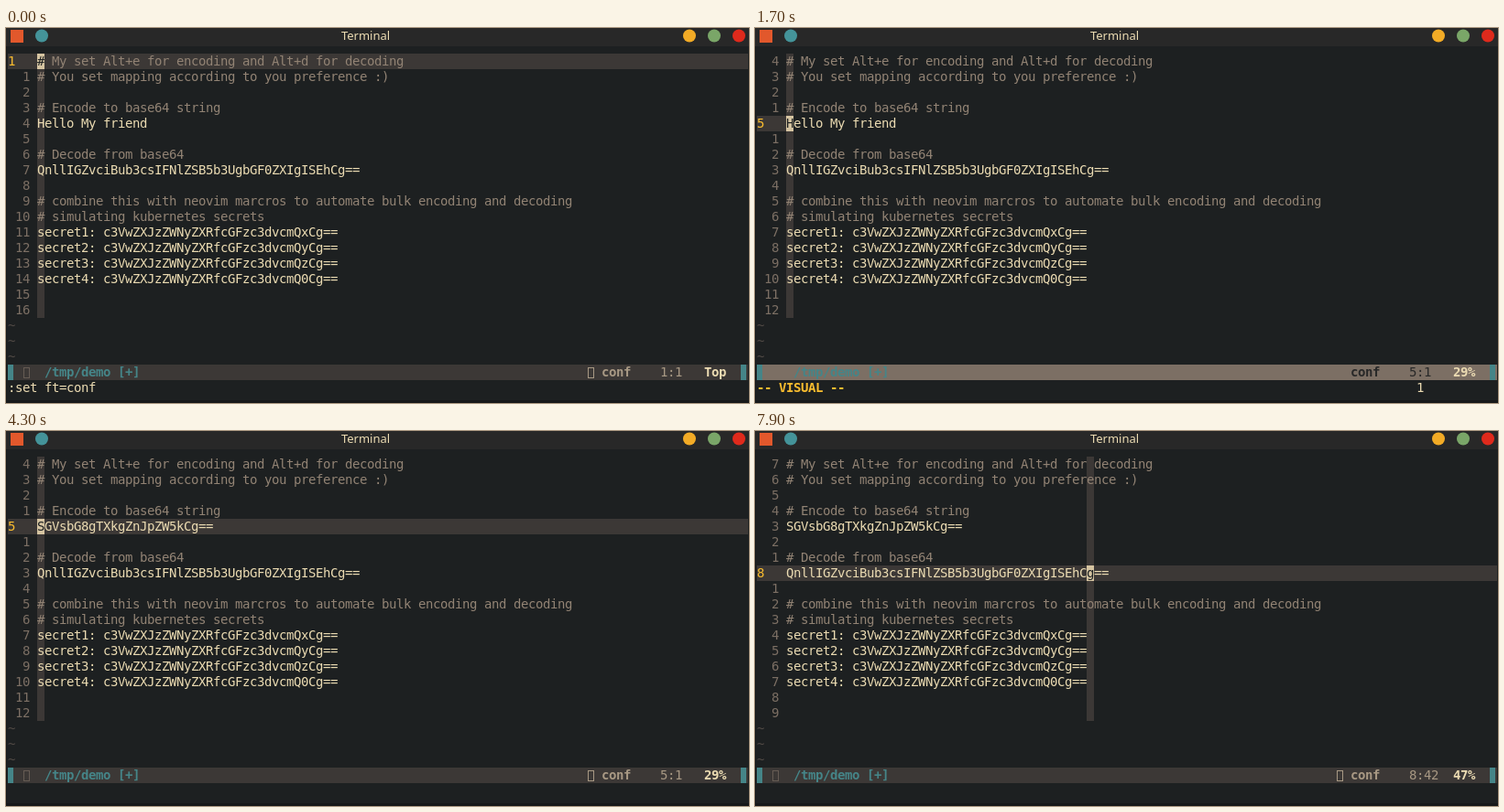
These frames come from a looping animation (811x410 px, 8000 ms). An HTML page with a canvas:

```html
<!DOCTYPE html>
<html lang="en">
<head>
<meta charset="utf-8">
<title>Terminal</title>
<style>
html, body { margin: 0; width: 100%; height: 100%; overflow: hidden; background: #1d2021; }
canvas { display: block; }
</style>
</head>
<body>
<canvas width="811" height="410"></canvas>
<script>
const ctx = document.querySelector('canvas').getContext('2d');
const LOOP = 8000, CELL_W = 8, CELL_H = 17, LEFT = 2, TOP = 28, GUTTER = 4;
const STATUS_ROW = 20, COMMAND_ROW = 21;
const C = {
  bg: '#1d2021', line: '#3c3836', fg: '#ebdbb2', comment: '#928374', number: '#7c6f64',
  dim: '#504945', yellow: '#fabd2f', cursor: '#d5c4a1', selected: '#665c54',
  teal: '#458588', info: '#a89984', dark: '#282828'
};

const LINES = [
  '# My set Alt+e for encoding and Alt+d for decoding',
  '# You set mapping according to you preference :)',
  '',
  '# Encode to base64 string',
  'Hello My friend',
  '',
  '# Decode from base64',
  'QnllIGZvciBub3csIFNlZSB5b3UgbGF0ZXIgISEhCg==',
  '',
  '# combine this with neovim marcros to automate bulk encoding and decoding',
  '# simulating kubernetes secrets',
  ...['Qx', 'Qy', 'Qz', 'Q0'].map((end, i) => `secret${i + 1}: c3VwZXJzZWNyZXRfcGFzc3dvcm${end}Cg==`),
  '', ''
];
const ENCODED = 'SGVsbG8gTXkgZnJpZW5kCg==';

// Cursor moves: [time, line, column]
const MOVES = [
  [0, 1, 1], [500, 2, 1], [700, 3, 1], [900, 4, 1], [1100, 5, 1],
  [2500, 5, 5], [2900, 5, 8], [3300, 5, 15], [4300, 5, 1],
  [5600, 6, 1], [5900, 7, 1], [6200, 8, 1], [7900, 8, 42]
];
const VISUAL_START = 1700, VISUAL_END = 4300;

const cellX = col => LEFT + col * CELL_W;
const cellY = row => TOP + row * CELL_H;

function fill(col, row, cols, rows, color) {
  ctx.fillStyle = color;
  ctx.fillRect(cellX(col), cellY(row), cols * CELL_W, rows * CELL_H);
}

function print(text, col, row, color, bold) {
  ctx.font = `${bold ? 'bold ' : ''}14px "DejaVu Sans Mono", monospace`;
  ctx.textAlign = 'left';
  ctx.fillStyle = color;
  [...text].forEach((ch, i) => ctx.fillText(ch, cellX(col + i), cellY(row) + 13));
}

function emptyGlyph(col, row, color) {
  ctx.strokeStyle = color;
  ctx.strokeRect(cellX(col) + 1.5, cellY(row) + 3.5, 6, 11);
}

function disc(x, color) {
  ctx.fillStyle = color;
  ctx.beginPath();
  ctx.arc(x, 8.5, 7, 0, Math.PI * 2);
  ctx.fill();
}

function drawWindow() {
  ctx.fillStyle = C.bg;
  ctx.fillRect(0, 0, 811, 410);
  ctx.fillStyle = '#282828';
  ctx.fillRect(0, 0, 811, 20);
  ctx.fillStyle = '#161819';
  ctx.fillRect(0, 20, 1, 390);
  ctx.fillRect(0, 407, 811, 3);
  ctx.fillStyle = '#e2582c';
  ctx.fillRect(5, 2, 14, 14);
  disc(39, '#449399');
  disc(746, '#f2ab26');
  disc(773, '#7aa668');
  disc(800, '#df2a1c');
  ctx.font = '13px "Noto Sans", sans-serif';
  ctx.textAlign = 'center';
  ctx.fillStyle = C.fg;
  ctx.fillText('Terminal', 392.5, 13);
}

function drawBuffer(lines, line, col, visual) {
  const row = line - 1, x = GUTTER + col - 1;
  fill(0, row, visual ? GUTTER : 101, 1, C.line);
  fill(x, 0, 1, lines.length, C.line);
  lines.forEach((text, i) => {
    const label = i === row ? String(line) : String(Math.abs(i - row)).padStart(3);
    print(label, 0, i, i === row ? C.yellow : C.number);
    print(text, GUTTER, i, text[0] === '#' ? C.comment : C.fg);
  });
  if (visual) {
    fill(GUTTER, row, col, 1, C.fg);
    print(lines[row].slice(0, col), GUTTER, row, C.selected);
  }
  fill(x, row, 1, 1, C.cursor);
  print(lines[row][col - 1] || '', x, row, C.bg);
  for (let i = lines.length; i < STATUS_ROW; i++) print('~', 0, i, C.dim);
}

function drawStatus(line, col, visual, total) {
  const info = visual ? C.dark : C.info;
  fill(0, STATUS_ROW, 101, 1, visual ? C.number : C.line);
  fill(0, STATUS_ROW, 0.75, 1, C.teal);
  fill(100, STATUS_ROW, 0.75, 1, C.teal);
  if (!visual) {
    emptyGlyph(2, STATUS_ROW, '#665c54');
    emptyGlyph(79, STATUS_ROW, C.info);
  }
  print('/tmp/demo [+]', 5, STATUS_ROW, C.teal, true);
  print('conf', 81, STATUS_ROW, info, true);
  print(`${line}:${col}`, 89, STATUS_ROW, info);
  const place = line === 1 ? 'Top' : Math.floor(line / total * 100) + '%';
  print(place, 95, STATUS_ROW, C.fg, true);
}

function draw(t) {
  const [, line, col] = MOVES.findLast(move => move[0] <= t);
  const visual = t >= VISUAL_START && t < VISUAL_END;
  const lines = LINES.slice();
  if (t >= VISUAL_END) lines[4] = ENCODED;

  drawWindow();
  drawBuffer(lines, line, col, visual);
  drawStatus(line, col, visual, lines.length);
  if (visual) {
    print('-- VISUAL --', 0, COMMAND_ROW, C.yellow, true);
    print(String(col), 90, COMMAND_ROW, C.fg);
  } else if (t < VISUAL_START) {
    print(':set ft=conf', 0, COMMAND_ROW, C.fg);
  }
}

const start = performance.now();
function tick() {
  draw((performance.now() - start) % LOOP);
  requestAnimationFrame(tick);
}
tick();
</script>
</body>
</html>
```
